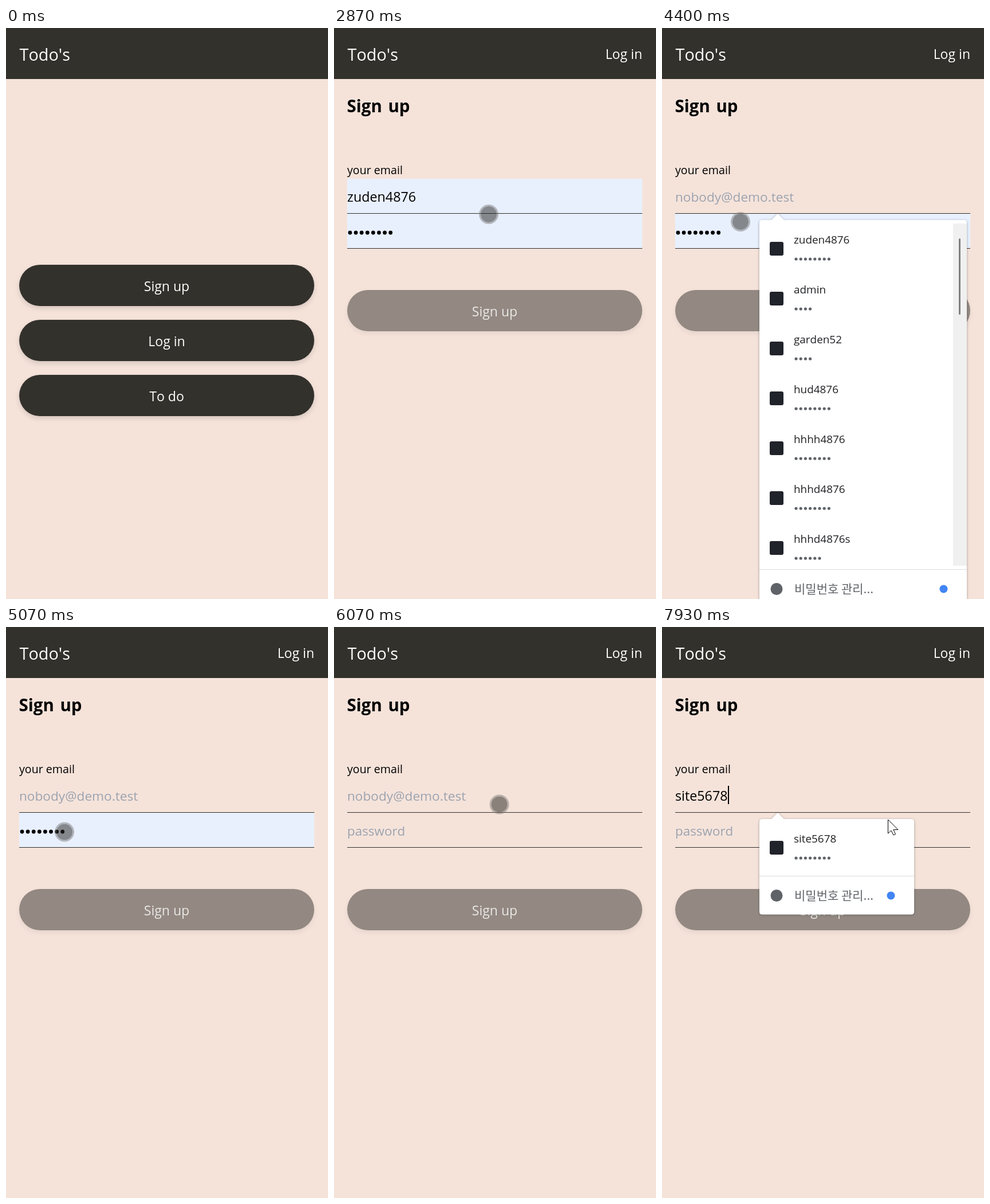
An HTML page that plays this animation: 562x996 px, repeating every 8 s.

```html
<!DOCTYPE html>
<html lang="en">
<head>
<meta charset="utf-8">
<title>Todo sign up</title>
<style>
  html, body { margin: 0; width: 100%; height: 100%; overflow: hidden; background: #f5e3da; }
  svg { display: block; width: 562px; height: 996px; }
  text { font-family: "Open Sans", "Noto Sans", sans-serif; font-kerning: none; white-space: pre; }
  .ko { font-family: "Noto Sans CJK KR", "Noto Sans CJK JP", "Noto Sans CJK", sans-serif; }
  .btn { filter: drop-shadow(0 4px 4px rgba(0, 0, 0, .13)); }
  .pop { filter: drop-shadow(0 1px 2px rgba(60, 64, 67, .45)); }
</style>
</head>
<body>
<svg id="stage" viewBox="0 0 562 996"></svg>
<script>
const LOOP = 8000;
const INK = '#33312c', BLUE = '#e8f0fe', GREY = '#5f6368', HINT = '#9ca3af';
const stage = document.getElementById('stage');
const pen = document.createElement('canvas').getContext('2d');
const FIELD = 23.3;

// [time, x, y]; a time alone hides the pointer until the next entry
const POINTER = [
  [270, 463, 437], [870, 306, 451], [1060, 306, 451], [1070, 310, 456], [1200, 313, 461], [1330],
  [1530, 317, 538], [1670],
  [2400, 300, 470], [2530, 288, 444], [2660, 288, 444], [2870, 270, 325], [3070, 243, 304], [3870],
  [4130, 200, 316], [4400, 137, 338], [4600, 108, 352], [4800, 108, 352], [5000, 100, 358],
  [5200, 106, 357], [5600, 330, 330], [6000, 300, 312], [6270, 256, 302], [6470, 326, 321],
  [6600, 344.5, 327], [7000, 394.5, 336]
];
const USERS = [
  ['zuden4876', 8], ['admin', 4], ['garden52', 4], ['hud4876', 8],
  ['hhhh4876', 8], ['hhhd4876', 8], ['hhhd4876s', 6]
];
const MATCHES = ['site5678', 'site', 'site5', 'site567'];
const TYPED = 'site5678';
const KEYS = [6800, 6930, 7070, 7270, 7470, 7600, 7730, 7870];

const rect = (x, y, w, h, fill, more = '') =>
  `<rect x="${x}" y="${y}" width="${w}" height="${h}" fill="${fill}" ${more}/>`;
const disc = (x, y, r, fill) => `<circle cx="${x}" cy="${y}" r="${r}" fill="${fill}"/>`;
const text = (s, x, y, size, fill, more = '') =>
  `<text x="${x}" y="${y}" font-size="${size}" fill="${fill}" ${more}>${s}</text>`;
const dots = (n, x, y, step, r, fill) =>
  Array.from({ length: n }, (_, i) => disc(x + i * step, y, r, fill)).join('');
const within = (t, a, b) => t >= a && t < b;

function textWidth(s) {
  pen.font = `${FIELD}px "Open Sans", "Noto Sans", sans-serif`;
  pen.fontKerning = 'none';
  return pen.measureText(s).width;
}

function button(label, y, alpha = 1) {
  return `<g class="btn" opacity="${alpha}">` + rect(23, y, 515, 72, INK, 'rx="36"') + '</g>' +
    text(label, 280.5, y + 46, 23, '#fff', `text-anchor="middle" opacity="${alpha === 1 ? 1 : .8}"`);
}

function row(name, count, i) {
  const y = 335 + i * 87;
  return rect(188, y + 38, 24, 24, '#20232a', 'rx="3"') +
    text(name, 230, y + 41, 18.9, '#202124') +
    dots(count, 234, y + 68, 8.2, 2.6, GREY);
}

function popup(rows, right, divider) {
  const bottom = divider + 67;
  return `<path class="pop" fill="#fff" d="M175 335H191L202 324L213 335H${right - 5}q5 0 5 5V${bottom - 5}` +
    `q0 5-5 5H175q-5 0-5-5V340q0-5 5-5z"/>` +
    rows.map(([name, count], i) => row(name, count, i)).join('') +
    rect(170, divider - .5, right - 170, 1, '#dadce0') +
    disc(200, divider + 34, 10.5, GREY) +
    text('비밀번호 관리...', 231, divider + 41, 21, GREY, 'class="ko"') +
    disc(right - 40.5, divider + 34, 7, '#4285f4');
}

const fullList = () => popup(USERS, 532, 944.5) +
  rect(508, 341, 24, 597, '#f0f0f0') + rect(518, 367, 3, 133, '#808080', 'rx="1.5"');

function matchList(typed) {
  const rows = MATCHES.filter(name => name.startsWith(typed)).map(name => [name, 8]);
  return popup(rows, 440, 434.5 + (rows.length - 1) * 87);
}

function home() {
  return ['Sign up', 'Log in', 'To do'].map((s, i) => button(s, 413 + i * 96)).join('');
}

function form(t) {
  const filled = within(t, 2670, 3600);
  const picked = within(t, 3330, 3600);
  const typed = TYPED.slice(0, KEYS.filter(k => t >= k).length);
  const email = filled ? 'zuden4876' : typed;
  const left = t < 2670 ? 0 : Math.max(0, Math.min(8, 8 - Math.floor((t - 5320) / 90)));
  const caret = within(t, 4130, 4270) || within(t, 4800, 5070) || t >= 6270;
  const list = within(t, 3270, 3600) || within(t, 4130, 5070) || t >= 6270;

  return text('Log in', 538, 54, 23, '#fff', 'text-anchor="end"') +
    text('Sign up', 22.5, 147, 29.5, '#000', 'font-weight="700" word-spacing="3"') +
    text('your email', 23, 255, 19.6, '#000') +
    (filled ? rect(23, 263, 515, 60, BLUE) : '') +
    (within(t, 2670, 5400) ? rect(23, 324, 515, 60, BLUE) : '') +
    (picked ? rect(23, 277, textWidth(email), 32, '#3390ff') : '') +
    (email ? text(email, 23, 303, FIELD, picked ? '#fff' : '#000')
           : text('nobody@demo.test', 23, 303, 22.6, HINT)) +
    (left ? dots(left, 28, 357, 10.1, 3.4, '#000') : text('password', 23, 364, 22.4, HINT)) +
    rect(23, 323, 515, 1, INK) + rect(23, 384, 515, 1, INK) +
    button('Sign up', 457, .5) +
    (caret ? rect(Math.round(23 + textWidth(typed)), 277, 2, 32, '#000') : '') +
    (list ? (typed ? matchList(typed) : fullList()) : '');
}

function pointer(t) {
  // the pointer is sampled fifteen times a second
  const now = Math.round(Math.floor((t + 4) * .015) / .15) * 10;
  const i = POINTER.findLastIndex(k => k[0] <= now);
  if (i < 0 || POINTER[i].length < 3) return '';
  let [at, x, y] = POINTER[i];
  const next = POINTER[i + 1];
  if (next && next.length === 3) {
    const p = (now - at) / (next[0] - at);
    x += (next[1] - x) * p;
    y += (next[2] - y) * p;
  }
  const shape = now >= 6530
    ? '<path d="M0 0V24L5.5 19L9.5 27L13 25.5L9.5 17.5H17.5Z" fill="#fff" stroke="#000"/>'
    : disc(0, 0, 14, 'rgba(40,38,35,.52)') +
      '<circle r="15.5" fill="none" stroke="rgba(120,118,115,.47)" stroke-width="3"/>';
  return `<g transform="translate(${x.toFixed(1)} ${y.toFixed(1)})">${shape}</g>`;
}

let shown = '';
function draw(t) {
  const scene = rect(0, 0, 562, 996, '#f5e3da') + rect(0, 0, 562, 89, INK) +
    text("Todo's", 23.5, 57, 28.8, '#fff') +
    (t < 2270 ? home() : form(t)) + pointer(t);
  if (scene !== shown) stage.innerHTML = shown = scene;
}

const start = performance.now();
function tick() {
  draw((performance.now() - start) % LOOP);
  requestAnimationFrame(tick);
}
tick();
</script>
</body>
</html>
```
